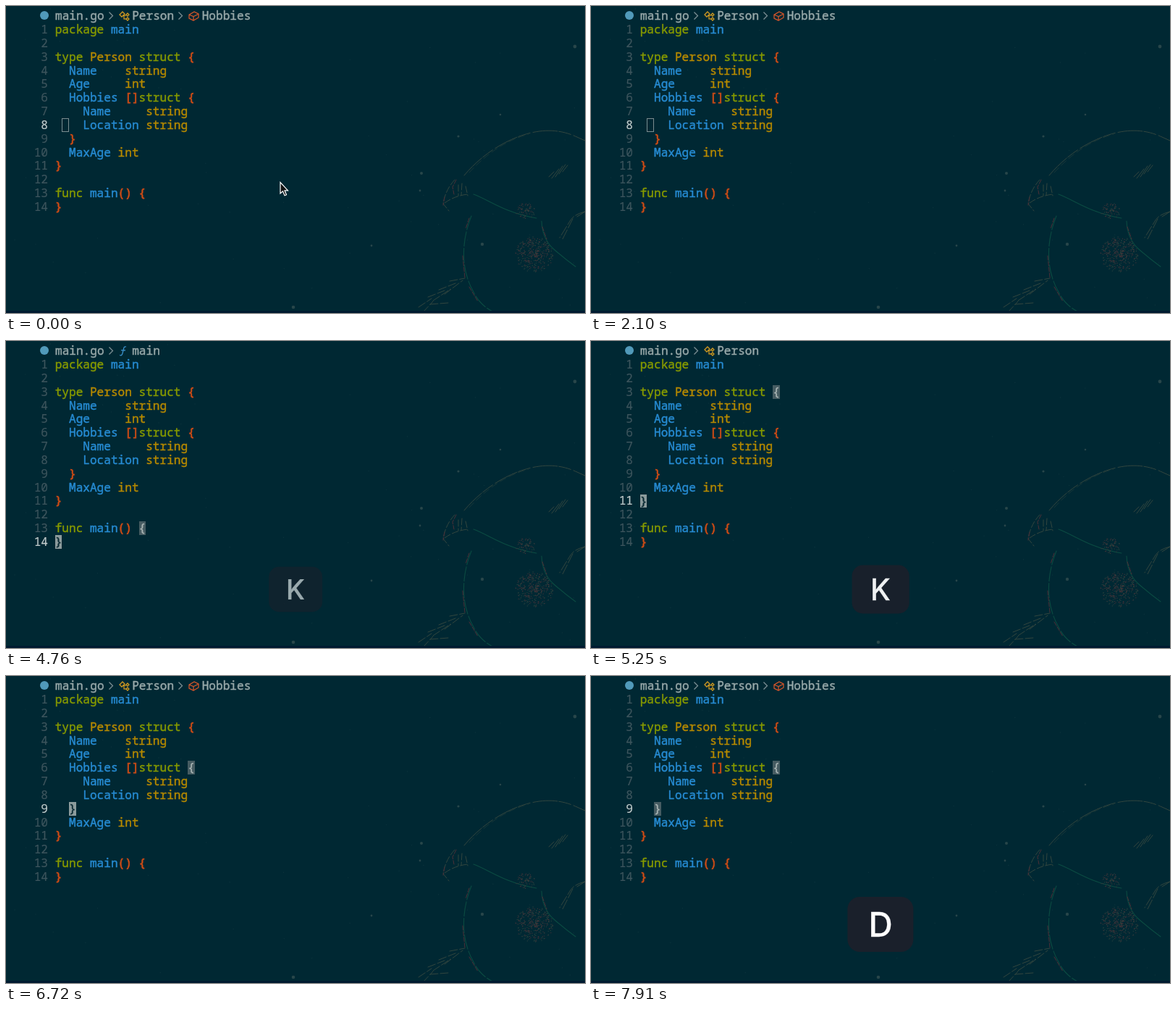
Recreate the animation shown at these times as an HTML page. Size 800 px wide and 424 px high, loop 8 s.

```html
<!DOCTYPE html>
<html lang="en">
<head>
<meta charset="utf-8">
<title>Editor</title>
<style>
  html, body { margin: 0; width: 100%; height: 100%; overflow: hidden; background: #002833; }
  #stage {
    position: relative; width: 800px; height: 424px; overflow: hidden; background: #002833;
    --cell: 9.66px; --row: 18.85px;
    font: 500 16.1px/18.85px "Noto Sans Mono", "DejaVu Sans Mono", monospace;
    font-variant-ligatures: none; white-space: pre; -webkit-text-stroke: .45px;
  }
  #stage > * { position: absolute; }
  #art { left: 0; top: 0; fill: none; stroke-linecap: round; }
  #floor { left: 0; right: 0; bottom: 0; height: 3px; background: #001a30; }
  #crumbs { left: 68px; top: 3.8px; color: #98a8a9; display: flex; }
  #crumbs svg { flex: none; width: 38.6px; height: 18.85px; fill: none; stroke-width: 1.25; }
  #badge { left: 47px; top: 7px; width: 12px; height: 12px; border-radius: 50%; background: #519aba; }
  #gutter { left: 28px; top: 23px; width: 30px; text-align: right; color: #3d555d; -webkit-text-stroke-width: .2px; }
  #gutter .on { color: #c3cccc; }
  #code { left: 67.7px; top: 23px; color: #268bd2; }
  .kw { color: #859900; }
  .ty { color: #b58900; }
  .br { color: #cb4b16; -webkit-text-stroke-width: .75px; }
  .mark { width: var(--cell); height: var(--row); box-sizing: border-box; }
  .block { background: #8c9b9c; color: #0a2a33; }
  .match { background: #465c62; color: #a9b5b4; }
  .hollow { border: 1px solid #7c8d90; }
  #pointer { left: 376px; top: 241px; }
  #key {
    left: 400px; top: 343px; height: 76px; padding: 0 29px; border-radius: 17px;
    background: #1a202b; color: #fff; display: flex; align-items: center; gap: 3px;
    font: 500 46px/76px Inter, "Open Sans", sans-serif; -webkit-text-stroke-width: .3px;
  }
  #key svg { width: 42px; height: 40px; fill: none; stroke: #fff; stroke-width: 4.6; stroke-linejoin: round; }
</style>
</head>
<body>
<div id="stage">
  <svg id="art" width="800" height="424">
    <g stroke="#33463f" stroke-width="1">
      <path d="M633 234C655 208 684 188 715 178S770 172 789 181L800 186" stroke-dasharray="34 2 17 4"/>
      <path d="M640 230C664 204 690 186 722 177" opacity=".5" stroke-dasharray="9 5"/>
      <path d="M620 240Q607 254 604 273L612 283M606 272Q620 262 638 260M625 247V262M630 245L629 261M635 249L638 262" stroke-dasharray="9 3"/>
      <path d="M750 236L757 229M754 238L764 225M759 236L769 221M764 232L773 219M769 229L776 220"/>
      <path d="M800 284Q783 288 778 299L765 320M783 294L768 324M800 284L789 291" stroke-dasharray="14 3"/>
      <path d="M570 416L588 404M576 423L590 408M583 402L606 393M590 407L614 391M598 392L621 383M606 398L631 379M613 380L634 376M586 412L611 410" stroke-dasharray="11 3"/>
    </g>
    <g stroke="#0b4b42" stroke-width="1.1">
      <path d="M646 260C668 268 690 286 733 293"/>
      <path d="M643 290C630 322 627 362 646 395Q655 414 676 424" stroke-dasharray="20 3"/>
      <path d="M740 297Q741 322 757 336T787 360"/>
    </g>
    <g stroke="#4d3038" stroke-width="1">
      <path d="M622 240L617 250L619 260M606 264L604 275M640 293L635 308M631 345L634 375M741 305L747 322M640 388L652 408" stroke-dasharray="6 2"/>
    </g>
  </svg>
  <div id="floor"></div>
  <div id="badge"></div>
  <div id="crumbs"></div>
  <div id="gutter"></div>
  <div id="code"></div>
  <div id="cursor" class="mark"></div>
  <div id="pair" class="mark match"></div>
  <svg id="pointer" width="18" height="24">
    <path d="M3 2.500V18L6.500 14.800L9 20.800L11.500 19.700L9 13.800H13.500Z" fill="#111" stroke="#fff" stroke-width="1.2"/>
  </svg>
  <div id="key"></div>
</div>
<script>
const LOOP = 8000, CELL = 9.66, ROW = 18.85, LEFT = 67.7, TOP = 23;
const $ = id => document.getElementById(id);

const lines = `package main

type Person struct {
  Name    string
  Age     int
  Hobbies []struct {
    Name     string
    Location string
  }
  MaxAge int
}

func main() {
}`.split("\n");

const highlight = text => text
  .replace(/\b(package|type|struct|func)\b|\b(Person|string|int)\b|([\[\](){}]+)/g,
    (word, kw, ty) => `<span class="${kw ? "kw" : ty ? "ty" : "br"}">${word}</span>`);

$("code").innerHTML = lines.map(highlight).join("\n");
$("gutter").innerHTML = lines.map((_, i) => `<div>${i + 1}</div>`).join("");

// Faint stars and the stippled shading of the wallpaper
let seed = 7;
const random = () => (seed = seed * 16807 % 2147483647) / 2147483647;
const dot = (x, y, r, color) =>
  `<circle cx="${x.toFixed(1)}" cy="${y.toFixed(1)}" r="${r}" fill="${color}"/>`;
function stipple(x, y, rx, ry, count) {
  let out = "";
  for (let i = 0; i < count; i++) {
    const a = random() * 2 * Math.PI, d = random() ** .7;
    out += dot(x + rx * d * Math.cos(a), y + ry * d * Math.sin(a), .6, random() < .6 ? "#4a343a" : "#304640");
  }
  return out;
}
let specks = stipple(730, 343, 26, 25, 380) + stipple(718, 283, 14, 11, 80);
for (let i = 0; i < 70; i++) specks += dot(random() * 800, random() * 420, .7, "#0c343d");
[[786, 56, 2.4], [574, 231, 2], [625, 180, 1.6], [397, 416, 2.3], [658, 329, 2.2], [505, 331, 1.4], [683, 150, 1.3], [572, 255, 1.4]]
  .forEach(([x, y, r]) => specks += dot(x, y, r, "#28464a"));
$("art").insertAdjacentHTML("beforeend", specks);

// Each breadcrumb separator holds a chevron and a symbol icon
const icons = {
  Person: `<g stroke="#d29a20"><path d="M21 8L25 4L28 7L24 11ZM26 9H30M27 9V14H30"/><path d="M30 8L32 6L34 8L32 10ZM30 14L32 12L34 14L32 16Z"/></g>`,
  Hobbies: `<path stroke="#d8562a" d="M21 8L28 4L34 7V12L27 16L21 13ZM21 8L27 10.500L34 7M27 10.500V16"/>`,
  MaxAge: `<path stroke="#3d94cf" d="M21 8L28 4L34 7V12L27 16L21 13ZM21 8L27 10.500L34 7"/>`,
  main: `<path stroke="#3d94cf" d="M30 4Q27 3 26.500 7L25 13Q24 17 21 15.500M23 9H29"/>`
};
const crumbs = path => "main.go" + path.map(name =>
  `<svg viewBox="0 0 38.6 18.85"><path stroke="#7d9095" d="M6.500 4.500L11.500 9.500L6.500 14.500"/>${icons[name]}</svg>${name}`).join("");

// at, cursor line, cursor column, cursor style, matching bracket [line, column], breadcrumb
const person = ["Person"], hobbies = ["Person", "Hobbies"];
const poses = [
  [0, 8, 1, "hollow", null, hobbies],
  [3500, 14, 0, "block", [13, 12], ["main"]],
  [4795, 13, 0, "block", null, ["main"]],
  [5005, 12, 0, "block", null, []],
  [5215, 11, 0, "block", [3, 19], person],
  [5425, 10, 1, "block", null, ["Person", "MaxAge"]],
  [5635, 9, 2, "block", [6, 19], hobbies],
  [7105, 9, 2, "match", [6, 19], hobbies]
];

const shift = `<svg viewBox="0 0 42 40"><path d="M21 3.500L39 22H29V36.500H13V22H3Z"/></svg>`;
const POP = 210, FADE = 280;
const presses = [
  ...[4760, 4970, 5180, 5390].map(at => ({ at, label: "K", end: at + POP })),
  { at: 5600, label: "K", end: 6130, fade: true },
  { at: 7070, label: shift + "A", end: 7630 },
  { at: 7630, label: "D", end: LOOP }
];

function place(el, line, col) {
  el.style.left = LEFT + col * CELL + "px";
  el.style.top = TOP + (line - 1) * ROW + "px";
  el.textContent = lines[line - 1][col] || " ";
}

let shownPose, shownLabel;
function showPose(pose) {
  if (pose === shownPose) return;
  shownPose = pose;
  const [, line, col, style, pair, path] = pose;
  $("cursor").className = "mark " + style;
  place($("cursor"), line, col);
  $("pair").hidden = !pair;
  if (pair) place($("pair"), ...pair);
  $("crumbs").innerHTML = crumbs(path);
  [...$("gutter").children].forEach((row, i) => row.className = i === line - 1 ? "on" : "");
}

function showKey(t) {
  const key = $("key");
  const press = presses.findLast(p => t >= p.at && t < p.end + (p.fade ? FADE : 0));
  key.style.visibility = press ? "visible" : "hidden";
  if (!press) return;
  if (press.label !== shownLabel) key.innerHTML = shownLabel = press.label;
  const pop = Math.min(1, (t - press.at) / POP);
  const out = press.fade ? Math.max(0, (t - press.end) / FADE) : 0;
  key.style.transform = `translate(-50%, -50%) scale(${.82 + .18 * pop - .18 * out})`;
  key.style.opacity = Math.min(1, .6 + pop) * (1 - out * out);
}

const start = performance.now();
function draw() {
  const t = (performance.now() - start) % LOOP;
  showPose(poses.findLast(p => t >= p[0]));
  showKey(t);
  $("pointer").style.visibility = t < 70 ? "visible" : "hidden";
  requestAnimationFrame(draw);
}
draw();
</script>
</body>
</html>
```
